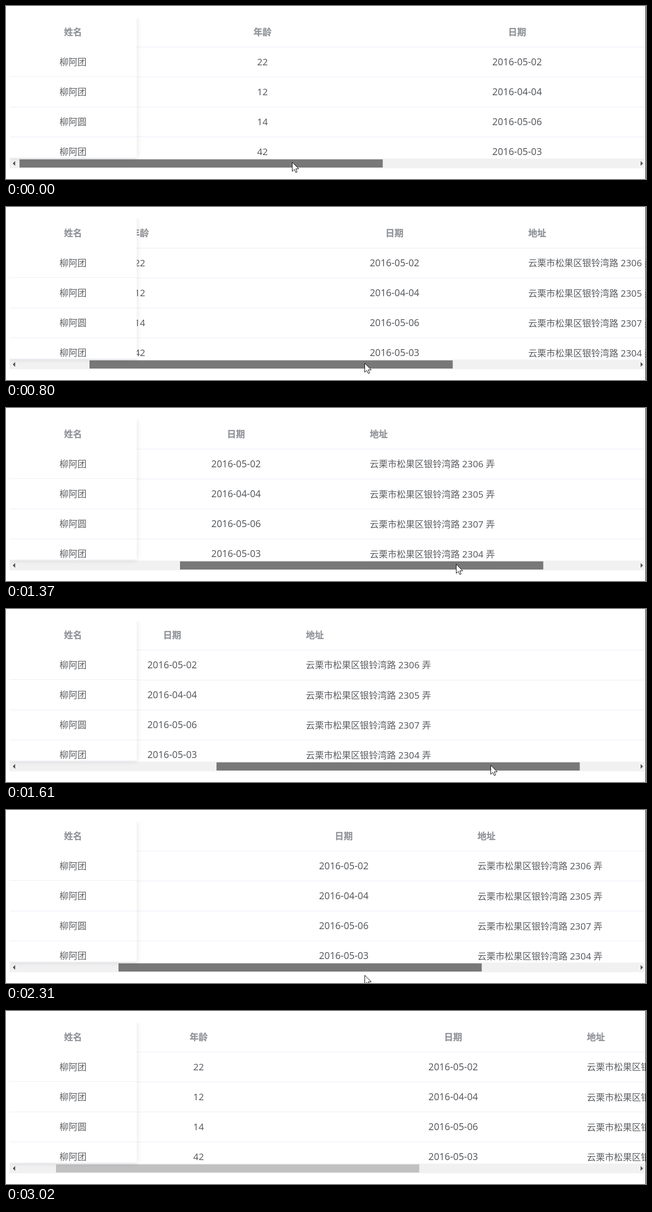
Animation, 1280 px wide and 347 px high, one loop 3580 ms. Source, as an HTML page:

```html
<!DOCTYPE html>
<html lang="zh-CN">
<head>
<meta charset="utf-8">
<title>固定列表格</title>
<style>
  html, body { margin: 0; width: 100%; height: 100%; overflow: hidden; background: #fff; }
  svg { display: block; width: 1280px; height: 347px; }
  text { font: 18px "Noto Sans", "Noto Sans CJK SC", "Noto Sans CJK", sans-serif; fill: #5c5e62; white-space: pre; }
  .mid { text-anchor: middle; }
  .head { font-weight: 700; fill: #909399; stroke: #909399; stroke-width: .25px; }
  .num { font-size: 18.6px; }
  .date { font-size: 19px; }
  .line { fill: #ebeef5; }
</style>
</head>
<body>
<svg viewBox="0 0 1280 347">
  <defs>
    <clipPath id="body"><rect x="7" y="23" width="1272" height="283"/></clipPath>
    <clipPath id="frame"><rect x="7" y="23" width="1272" height="324"/></clipPath>
    <filter id="blur" x="-20%" y="-20%" width="140%" height="140%"><feGaussianBlur stdDeviation="6"/></filter>
  </defs>
  <rect width="1280" height="347" fill="#fff"/>
  <g clip-path="url(#body)">
    <g id="lines"></g>
    <g id="scrolled"></g>
  </g>
  <rect x="7" y="306" width="1271" height="19.5" fill="#f1f1f1"/>
  <path d="M18.3 311v9.4l-4.7-4.7zM1269.3 311v9.4l4.7-4.7z" fill="#505050"/>
  <rect id="thumb" y="307.6" width="726.5" height="16.4"/>
  <g clip-path="url(#frame)">
    <path d="M7 23H261.5V305H7z" opacity=".12" filter="url(#blur)"/>
    <path d="M7 23H261.5V305H7z" fill="#fff"/>
    <g id="fixed"></g>
  </g>
  <rect x="1279" width="1" height="347" fill="#111"/>
  <path id="cursor" d="M0 0V18L4.2 14.3 7 20.5 9.8 19.3 7.1 13.2H13z" fill="#fff" stroke="#000"/>
</svg>
<script>
const LOOP = 3580, TICK = 47.2, LAST_TICK = 64;
const THUMB_START = 27, SCROLL_RATIO = 1.751, RELEASE_TICK = 56;
const AGE_X = 513, DATE_X = 1022.2, ADDRESS_X = 1289.6;
const $ = id => document.getElementById(id);

const rows = [
  ['柳阿团', '22', '2016-05-02', 2306],
  ['柳阿团', '12', '2016-04-04', 2305],
  ['柳阿圆', '14', '2016-05-06', 2307],
  ['柳阿团', '42', '2016-05-03', 2304],
];

const label = (x, y, cls, text) => `<text x="${x}" y="${y}" class="${cls}">${text}</text>`;
const line = (x, y, width) => `<rect class="line" x="${x}" y="${y}" width="${width}" height="1"/>`;

function buildTable() {
  const head = (x, text, cls = 'mid') => label(x, 58.8, cls + ' head', text);
  let lines = line(7, 82, 1272);
  let scrolled = head(AGE_X, '年龄') + head(DATE_X, '日期') + head(ADDRESS_X, '地址', '');
  let fixed = head(134, '姓名') + line(7, 304, 254.5);
  rows.forEach(([name, age, date, lane], i) => {
    const y = 118.8 + 60.2 * i, rule = Math.round(142 + 60.2 * i);
    fixed += label(134, y, 'mid', name);
    scrolled += label(AGE_X, y, 'mid num', age) + label(DATE_X, y, 'mid date', date) +
      label(ADDRESS_X, y + .5, '', `云栗市松果区银铃湾路<tspan class="num"> ${lane} </tspan>弄`);
    if (i < 3) {
      lines += line(7, rule, 1272);
      fixed += line(7, i ? rule : rule - 1, 254.5);
    }
  });
  $('lines').innerHTML = lines;
  $('scrolled').innerHTML = scrolled;
  $('fixed').innerHTML = fixed;
}

// Monotone cubic curve through [tick, value] points, flat at both ends.
function curve(points) {
  const slope = i => (points[i + 1][1] - points[i][1]) / (points[i + 1][0] - points[i][0]);
  const tangent = points.map((_, i) => {
    if (!i || i === points.length - 1) return 0;
    const a = slope(i - 1), b = slope(i);
    return a * b <= 0 ? 0 : 2 * a * b / (a + b);
  });
  return n => {
    const last = points.length - 1;
    if (n <= points[0][0]) return points[0][1];
    if (n >= points[last][0]) return points[last][1];
    const i = points.findIndex(p => p[0] > n) - 1;
    const [t0, v0] = points[i], [t1, v1] = points[i + 1];
    const span = t1 - t0, u = (n - t0) / span, w = 1 - u;
    return v0 * (1 + 2 * u) * w * w + v1 * u * u * (3 - 2 * u) +
      span * u * w * (tangent[i] * w - tangent[i + 1] * u);
  };
}

const thumbX = curve([[0, 27], [11, 88], [12, 94], [22, 255], [29, 348], [36, 444],
  [41, 481], [42, 481], [49, 225], [52, 118], [55, 100]]);
const cursorX = curve([[0, 573], [11, 636], [12, 643], [22, 806], [29, 901], [36, 994],
  [40, 1028], [42, 1022], [49, 718], [52, 646]]);
const cursorY = curve([[0, 313], [45, 313], [48, 325], [49, 331], [51, 352]]);

function render(ms) {
  const tick = Math.min(LAST_TICK, Math.floor((Math.floor(ms / 10) * 10 + 5) / TICK));
  const x = Math.round(thumbX(tick));
  $('thumb').setAttribute('x', x);
  $('thumb').setAttribute('fill', tick < RELEASE_TICK ? '#787878' : '#c1c1c1');
  $('scrolled').setAttribute('transform', `translate(${-(x - THUMB_START) * SCROLL_RATIO} 0)`);
  $('cursor').setAttribute('transform',
    `translate(${Math.round(cursorX(tick)) - .5} ${Math.round(cursorY(tick)) + .5})`);
}

buildTable();
const start = performance.now();
function play(now) {
  render(Math.max(0, now - start) % LOOP);
  requestAnimationFrame(play);
}
render(0);
requestAnimationFrame(play);
</script>
</body>
</html>
```
